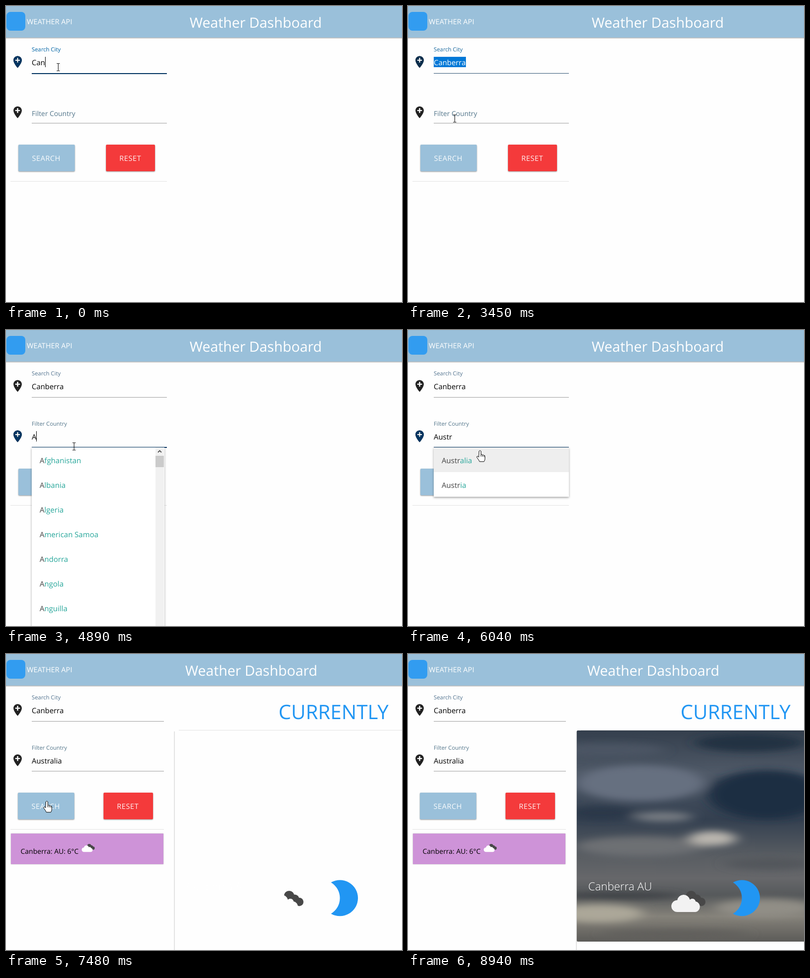
Recreate the animation shown at these times as an HTML page. Size 800 by 600 pixels, loop 9560 ms.

```html
<!DOCTYPE html>
<html lang="en">
<head>
<meta charset="utf-8">
<title>Weather Dashboard</title>
<style>
  html, body { margin: 0; width: 100%; height: 100%; overflow: hidden; background: #fefefe; }
  svg { display: block; width: 800px; height: 600px; }
  text { font-family: "Open Sans", "Noto Sans", sans-serif; text-rendering: geometricPrecision; white-space: pre; }
  .input { font-size: 14.9px; fill: #000; }
  .label { font-size: 11.35px; fill: #52738f; }
  .btn text { font-size: 14.7px; letter-spacing: .5px; fill: #fff; fill-opacity: .93; }
  .btn rect { filter: drop-shadow(0 1px 1px rgba(0,0,0,.42)); }
  .btn.hover rect { filter: drop-shadow(0 1.5px 1px rgba(0,0,0,.42)); }
  .focus { fill: #013461; }
  .rule { fill: #9e9e9e; }
  .hr { fill: #e2e2e2; }
  #header { fill: #9ac0da; filter: drop-shadow(0 1px 1px rgba(0,0,0,.4)); }
  #panel { filter: drop-shadow(0 2px 2px rgba(0,0,0,.35)); }
  #rows text { font-size: 15.05px; fill: #26a69a; }
  #rows .hit { fill: #444; }
  #cursor path { stroke: #000; stroke-width: 1; fill: #fff; stroke-linejoin: round; }
  #cursor #beam { fill: none; }
</style>
</head>
<body>
<svg viewBox="0 0 800 600">
  <defs>
    <path id="pin" d="M12 2C8.14 2 5 5.14 5 9c0 5.25 7 13 7 13s7-7.75 7-13c0-3.86-3.14-7-7-7zm4 8h-3v3h-2v-3H8V8h3V5h2v3h3v2z"/>
    <g id="cloudy">
      <g fill="#484848"><circle cx="40" cy="10.5" r="10.5"/><circle cx="51" cy="17" r="9.5"/><circle cx="60.5" cy="22.5" r="8.5"/></g>
      <path fill="currentColor" d="M12 43A12 12 0 0 1 12 19A13 13 0 0 1 37.5 18A6.8 6.8 0 0 1 49 21.5A11 11 0 0 1 49 43z"/>
    </g>
    <linearGradient id="sky" x2="0" y2="1">
      <stop offset="0" stop-color="#343f4d"/><stop offset=".2" stop-color="#4f5967"/>
      <stop offset=".42" stop-color="#344050"/><stop offset=".6" stop-color="#5a5e63"/>
      <stop offset=".7" stop-color="#66676a"/><stop offset=".78" stop-color="#56595b"/>
      <stop offset=".88" stop-color="#85827a"/><stop offset="1" stop-color="#5c5b58"/>
    </linearGradient>
    <clipPath id="frame"><rect x="341" y="155" width="470" height="428" rx="2"/></clipPath>
    <filter id="soft" x="-50%" y="-100%" width="200%" height="300%"><feGaussianBlur stdDeviation="14 7"/></filter>
  </defs>

  <rect id="header" x="-5" y="-5" width="810" height="69"/>
  <rect x="1" y="12" width="38" height="38" rx="8" fill="#329cf0"/>
  <text x="42" y="37" font-size="14.6" fill="#fff">WEATHER API</text>
  <text id="title" x="371" y="44" font-size="28.5" fill="#fff">Weather Dashboard</text>

  <g id="city">
    <use href="#pin" transform="translate(9 99) scale(1.208)" fill="#212121"/>
    <use class="focus" href="#pin" transform="translate(9 99) scale(1.208)"/>
    <text class="label" x="52" y="92">Search City</text>
    <text class="label focus" x="52" y="92" style="fill:#358fc8">Search City</text>
    <rect class="rule line" x="52" y="136" height="1"/>
    <rect class="focus line" x="52" y="136" height="2"/>
    <rect id="mark" x="52" y="103" width="65" height="21" fill="#0078d7"/>
    <text class="input" x="52" y="120"></text>
    <rect class="caret" y="103" width="1" height="21"/>
  </g>

  <g id="country">
    <use href="#pin" transform="translate(9 201) scale(1.208)" fill="#212121"/>
    <use class="focus" href="#pin" transform="translate(9 201) scale(1.208)"/>
    <text id="hint" x="52" fill="#52758a">Filter Country</text>
    <rect class="rule line" x="52" y="237" height="1"/>
    <rect class="focus line" x="52" y="237" height="2"/>
    <text class="input" x="52" y="222"></text>
    <rect class="caret" y="205" width="1" height="21"/>
  </g>

  <g class="btn" id="search">
    <rect x="25" y="281" width="114" height="54" rx="2" fill="#9ac0da"/>
    <text x="52.5" y="314">SEARCH</text>
  </g>
  <g class="btn" id="reset">
    <rect x="202" y="281" width="99" height="54" rx="2" fill="#f43a3b"/>
    <text x="229" y="314">RESET</text>
  </g>
  <rect class="hr" id="divider" x="9" y="355" height="1"/>

  <g id="entry">
    <rect id="entryBox" x="10" y="364" height="62" fill="#ce93d8" style="filter:drop-shadow(0 0 1px rgba(0,0,0,.3))"/>
    <text x="29.5" y="405" font-size="14">Canberra: AU: 6°C</text>
    <use href="#cloudy" transform="translate(153 385) scale(.38)" color="#fff"/>
  </g>

  <g id="result">
    <text x="550.5" y="132" font-size="40.4" fill="#2196f3">CURRENTLY</text>
    <rect class="hr" x="349" y="154" width="451" height="1"/>
    <rect x="339.5" y="157" width="1.5" height="443" fill="#dcdcdc"/>
    <g id="photo" clip-path="url(#frame)">
      <rect x="341" y="155" width="460" height="428" fill="url(#sky)"/>
      <g filter="url(#soft)">
        <ellipse cx="470" cy="262" rx="130" ry="36" fill="#667080"/>
        <ellipse cx="400" cy="195" rx="120" ry="14" fill="#4b5563"/>
        <ellipse cx="725" cy="285" rx="120" ry="50" fill="#1d2d42"/>
        <ellipse cx="690" cy="180" rx="110" ry="18" fill="#233143"/>
        <ellipse cx="390" cy="322" rx="70" ry="14" fill="#2b3748"/>
        <ellipse cx="515" cy="330" rx="60" ry="10" fill="#777b82"/>
        <ellipse cx="470" cy="390" rx="130" ry="20" fill="#6d7073"/>
        <ellipse cx="615" cy="374" rx="48" ry="15" fill="#b9b5ae"/>
        <ellipse cx="730" cy="425" rx="90" ry="12" fill="#53575b"/>
        <ellipse cx="430" cy="490" rx="120" ry="7" fill="#3c4145"/>
        <ellipse cx="385" cy="526" rx="90" ry="18" fill="#aca799"/>
        <ellipse cx="720" cy="515" rx="100" ry="18" fill="#918e86"/>
        <ellipse cx="540" cy="568" rx="150" ry="9" fill="#605f5c"/>
      </g>
    </g>
    <text x="364" y="479" font-size="22.4" font-weight="300" fill="#fff">Canberra AU</text>
    <use id="icon" href="#cloudy" transform="translate(532 480)"/>
    <path fill="#2196f3" d="M656.5 463A36.5 36.5 0 1 1 656.5 526.5A37 37 0 0 0 656.5 463z"/>
  </g>

  <g id="list">
    <rect id="panel" x="52" y="238" fill="#fff"/>
    <rect id="hover" x="52" y="238" width="273" height="50" fill="#eee"/>
    <g id="rows"></g>
    <g id="bar">
      <rect x="302" y="238" width="17" height="370" fill="#f1f1f1"/>
      <rect x="302" y="255" width="17" height="23" fill="#cbcbcb"/>
      <path d="M307 248l3.5-3.5 3.5 3.5" fill="none" stroke="#505050" stroke-width="1.8"/>
    </g>
  </g>

  <g id="cursor">
    <path id="beam" d="M-3 -7.5h2.5l.5 .5l.5-.5h2.5M0-7V7M-3 7.5h2.5l.5-.5l.5 .5h2.5"/>
    <path id="arrow" d="M.5.5v16l3.7-3.5 2.8 6 2.2-1-2.7-5.8h5z"/>
    <path id="hand" d="M-2 1.5q2-2.5 4 0v7q2-1 3 .8q2-.8 3 1q2-.6 2 1.5v5q0 3-2 6h-9q-1-3-5-8q-1.5-2 .5-3q1.5-.3 3 2zM2 8.5v4M5 9.3v3.5M8 10.3v3"/>
  </g>
</svg>
<script>
const LOOP = 9560;
const $ = s => document.querySelector(s);
const all = s => document.querySelectorAll(s);
const ramp = (t, from, to) => Math.min(1, Math.max(0, (t - from) / (to - from)));
const ease = p => 1 - (1 - p) ** 2;
const within = (t, from, to) => t >= from && t < to;
const show = (s, on) => { $(s).style.display = on ? '' : 'none'; };
const set = (s, attrs) => { for (const k in attrs) $(s).setAttribute(k, attrs[k]); };
const typed = (word, t, times, start) => word.slice(0, start + times.filter(k => t >= k).length);

const names = ['Afghanistan', 'Albania', 'Algeria', 'American Samoa', 'Andorra',
  'Angola', 'Anguilla', 'Australia', 'Austria'];

// time, x, y, shape kept until the next point
const track = [
  [0, 105, 124, 'beam'], [1160, 105, 124, 'beam'], [1160, 125, 119, 'beam'],
  [1340, 125, 119, 'beam'], [1460, 124, 145, 'arrow'], [1640, 122, 238, 'arrow'],
  [1980, 122, 238, 'arrow'], [2060, 119, 238, 'arrow'], [2370, 119, 238, 'arrow'],
  [2480, 108, 224, 'beam'], [2660, 108, 224, 'beam'], [2720, 100, 180, 'arrow'],
  [2800, 88, 125, 'beam'], [2860, 85, 115, 'beam'], [3330, 85, 115, 'beam'],
  [3370, 88, 145, 'arrow'], [3430, 94, 228, 'beam'], [3750, 94, 228, 'beam'],
  [3850, 105, 243, 'arrow'], [3980, 118, 256, 'arrow'], [4200, 132, 238, 'beam'],
  [4280, 137, 236, 'beam'], [6040, 137, 236, 'beam'], [6040, 145, 244, 'hand'],
  [6260, 145, 244, 'arrow'], [6460, 95, 285, 'hand'], [6560, 82, 298, 'hand'],
  [8590, 82, 298, 'hand'], [8650, 120, 330, 'arrow'], [8940, 689, 601, 'arrow'],
  [LOOP, 689, 601, 'arrow']
];

function moveCursor(t) {
  const i = track.findLastIndex(p => p[0] <= t);
  const a = track[i], b = track[i + 1] || a;
  const p = ramp(t, a[0], Math.max(b[0], a[0] + 1));
  const x = Math.round(a[1] + (b[1] - a[1]) * p), y = Math.round(a[2] + (b[2] - a[2]) * p);
  set('#cursor', { transform: `translate(${x + .5} ${y})` });
  for (const s of ['beam', 'arrow', 'hand']) show('#' + s, s === a[3]);
}

function drawField(id, text, focus, caret) {
  all(`#${id} .focus`).forEach(e => { e.style.opacity = focus; });
  set(`#${id} .focus.line`, { height: focus > .85 ? 2 : 1 });
  const input = $(`#${id} .input`);
  input.textContent = text;
  set(`#${id} .caret`, { x: Math.round(52 + (text ? input.getComputedTextLength() : 0)) });
  show(`#${id} .caret`, caret);
}

let shown = '';
function drawList(t, query) {
  const open = within(t, 4770, 6400);
  show('#list', open);
  if (!open) return;
  $('#list').style.opacity = ramp(t, 4740, 4860) * (1 - ramp(t, 6200, 6400));
  const hits = names.filter(n => n.startsWith(query));
  const long = hits.length > 2;
  set('#panel', { width: long ? 268 : 273, height: long ? 370 : 100 });
  show('#bar', long);
  show('#hover', t >= 6040);
  if (query === shown) return;
  shown = query;
  $('#rows').innerHTML = hits.map((n, i) =>
    `<text x="68" y="${270 + i * 50}"><tspan class="hit">${query}</tspan>${n.slice(query.length)}</text>`).join('');
}

function drawHint(t) {
  const p = ease(ramp(t, 3450, 3650));
  set('#hint', { y: 223 - 29 * p, 'font-size': 13.9 - 2.65 * p });
}

function drawLayout(t) {
  const narrow = t >= 7480, right = narrow ? 319 : 325;
  all('.line').forEach(e => e.setAttribute('width', right - 52));
  set('#divider', { width: right - 9 });
  set('#entryBox', { width: right - 11 });
  set('#title', { x: narrow ? 362 : 371 });
  set('#search', { transform: `translate(${narrow ? -1 : 0} 0)` });
  set('#reset', { transform: `translate(${narrow ? -5 : 0} 0)` });
  set('#reset rect', { width: narrow ? 100 : 99 });
  $('#search').classList.toggle('hover', within(t, 6500, 8640));
  show('#entry', t >= 7300);
  show('#result', narrow);
  show('#photo', t >= 7540);
  set('#icon', { color: t >= 7540 ? '#f2f2f2' : '#fefefe' });
}

function render(t) {
  const city = typed('Canberra', t, [190, 250, 430, 550, 860], 3);
  const cityFocus = t < 2500 ? 1 - ease(ramp(t, 1760, 2060))
    : ease(ramp(t, 2840, 3140)) - ease(ramp(t, 3400, 3700));
  const marked = within(t, 2960, 3490);
  drawField('city', city, cityFocus, t < 1760 || within(t, 2840, 2960));
  show('#mark', marked);
  $('#city .input').style.fill = marked ? '#fff' : '';

  const query = typed('Austr', t, [4770, 5010, 5130, 5300, 5420], 0);
  const focus = ease(ramp(t, 3460, 3760)) - ease(ramp(t, 6240, 6540));
  const caret = within(t, 3500, 4000) || within(t, 4530, 5610);
  drawField('country', t < 6200 ? query : 'Australia', focus, caret);
  drawHint(t);
  drawLayout(t);
  drawList(t, query);
  moveCursor(t);
}

const start = performance.now();
function tick() {
  render((performance.now() - start) % LOOP);
  requestAnimationFrame(tick);
}
tick();
</script>
</body>
</html>
```
